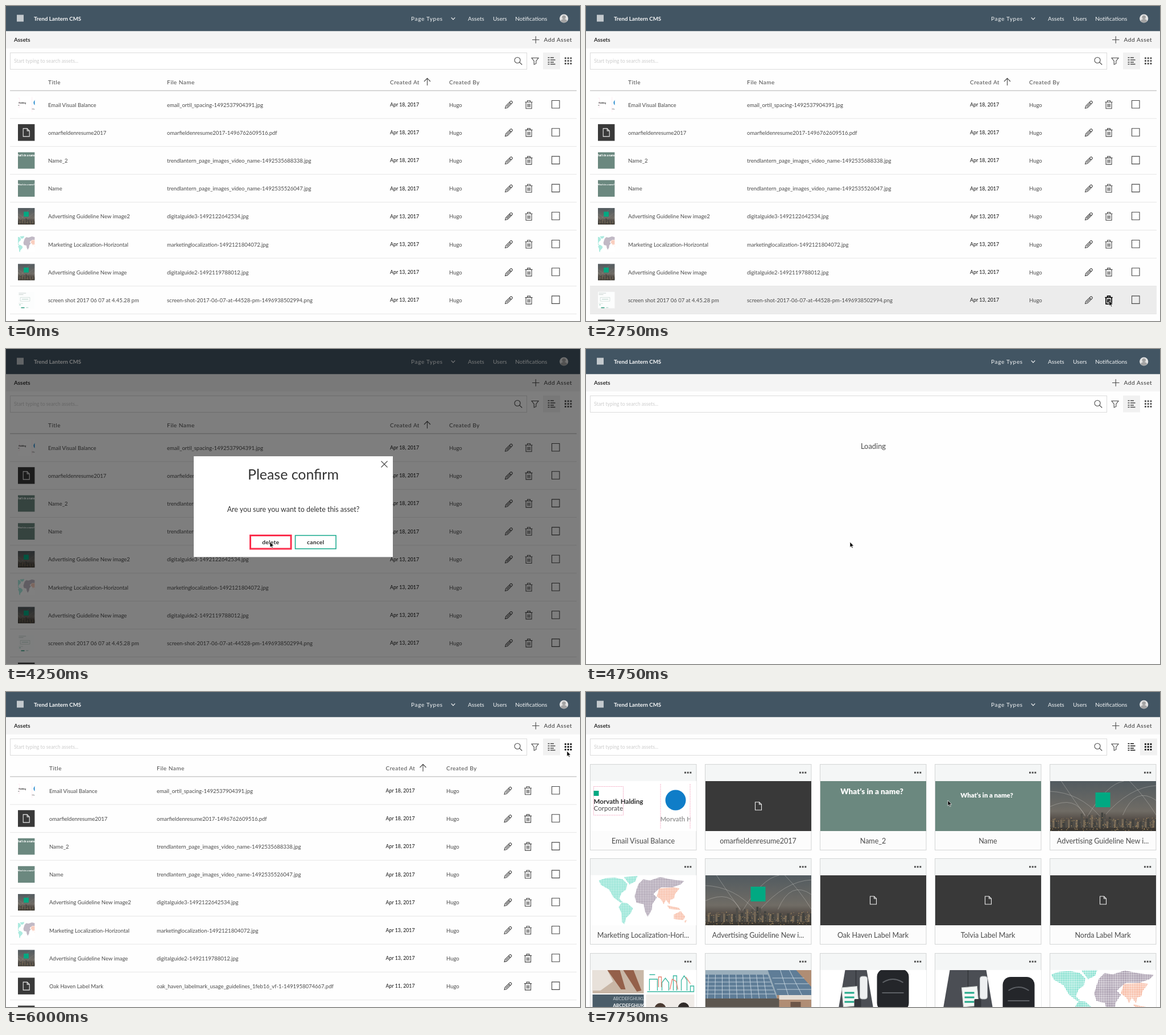
Write an HTML page that moves like this. It is 1009 by 555 pixels and loops after 8 s.

```html
<!DOCTYPE html>
<html lang="en">
<head>
<meta charset="utf-8">
<title>Asset manager</title>
<style>
html, body { margin: 0; width: 100%; height: 100%; overflow: hidden; background: #fefefe; }
svg { display: block; }
text { font-family: Lato, "Open Sans", sans-serif; fill: #4a4a4a; white-space: pre; }
.line { fill: none; stroke: #484848; stroke-width: 1.1; }
.mid { text-anchor: middle; }
.bold { font-weight: 700; fill: #2b2b2b; }
.nav { fill: #f2f4f5; }
.slogan { font-weight: 900; fill: #fff; }
</style>
</head>
<body>
<svg id="stage" width="1009" height="555" viewBox="0 0 1009 555"></svg>
<script>
const LOOP = 8000, ROW = 49.2, TOP = 149;
const stage = document.getElementById('stage');

const text = (x, y, str, size, cls = '', extra = '') =>
  `<text x="${x}" y="${y}" font-size="${size}" class="${cls}" ${extra}>${str}</text>`;
const rect = (x, y, w, h, fill, extra = '') =>
  `<rect x="${x}" y="${y}" width="${w}" height="${h}" fill="${fill}" ${extra}/>`;
const path = (d, extra = 'class="line"') => `<path d="${d}" ${extra}/>`;
const shape = (d, fill) => path(d, `fill="${fill}"`);
const circle = (x, y, r, fill) => `<circle cx="${x}" cy="${y}" r="${r}" fill="${fill}"/>`;
const at = (x, y, body, scale = 1) => `<g transform="translate(${x} ${y}) scale(${scale})">${body}</g>`;
const group = (id, body) => `<g id="${id}">${body}</g>`;
const times = (n, fn) => Array.from({ length: n }, (_, i) => fn(i)).join('');
const spaced = n => `letter-spacing="${n}"`;

let seed = 7;
const rnd = () => (seed = seed * 16807 % 2147483647) / 2147483647;

// Pictures, shared by list thumbnails and grid cards
const dots = (id, color) =>
  `<pattern id="${id}" width="2.6" height="2.6" patternUnits="userSpaceOnUse">${rect(.3, .3, 2, 2, color, 'rx=".7"')}</pattern>`;

const worldMap =
  shape('M2 8L14 4 30 3 44 6 52 14 50 24 42 30 38 40 44 46 40 47 28 38 20 24 6 16Z' +
        'M46 2L70 0 66 10 56 15ZM42 47L52 48 62 57 58 66 50 74 47 85 43 82 42 66 37 55Z', 'url(#teal)') +
  shape('M68 25L72 14 80 6 92 8 110 2 128 6 152 9 146 15 132 20 112 20 104 26 98 32 104 38 96 50 95 60 88 72 83 62 81 50 68 47 65 36Z', 'url(#plum)') +
  shape('M108 22L134 20 144 22 136 32 134 40 128 42 126 50 120 42 116 50 112 42 104 36Z' +
        'M122 52L142 56 146 60 126 58ZM134 68L146 62 154 72 150 78 134 76ZM152 80l5-3-3 6Z', 'url(#coral)');

function city() {
  const blocks = times(42, i => {
    const h = 5 + rnd() * (i > 11 && i < 24 ? 19 : 7);
    return rect(i * 4.5, 78 - h, 3.6, h + 4, ['#514f4a', '#756958', '#41423f'][i % 3]);
  });
  const lights = times(190, () =>
    rect((rnd() * 187).toFixed(1), (64 + rnd() * 23).toFixed(1), 1.3, 1, rnd() > .5 ? '#c9a56b' : '#8d7858'));
  const arcs = path('M0 18Q52 20 88 62M20 0Q50 45 62 60M66 62Q100 5 130 0M95 62Q140 10 187 8M128 60Q150 8 187 34M0 45Q45 24 62 62M140 0Q165 25 187 60',
    'fill="none" stroke="#d8d6cf" stroke-width=".6" opacity=".6"');
  return rect(0, 0, 187, 88, 'url(#dusk)') + arcs + blocks + lights + rect(80, 20, 26, 26, '#01a982');
}

const slogan = (x, y, size) => rect(0, 0, 187, 88, '#6b887f') +
  text(x, y, 'What’s in a name?', size, 'slogan mid');

const spacing = rect(0, 0, 187, 88, '#fff') +
  path('M6 9.5H58V60H6ZM123.5 5V84M175.5 5V84', 'fill="none" stroke="#f19ab8" stroke-width=".8" stroke-dasharray="2 1"') +
  rect(6, 17, 9, 9, '#01a982') +
  text(6, 40, 'Morvath Halding', 11.6, 'bold') + text(6, 51.5, 'Corporate', 11.6) +
  circle(150, 33.5, 18, '#0f7dc8') +
  `<svg width="176" height="88">${text(123, 71, 'Morvath H', 11.4, 'bold', 'style="fill:#999"')}</svg>`;

const screenshot = rect(0, 0, 187, 88, '#fcfdfd') +
  path('M54 8H92M54 15H78', 'stroke="#c9d2cf" stroke-width="3"') +
  path('M62 30H112V50H62ZM54 62H76', 'fill="none" stroke="#c2d4ce" stroke-width="2"') +
  rect(70, 38, 34, 3, '#b7cfc7') + rect(56, 68, 8, 3, '#8cc9b4') +
  rect(66, 82, 18, 5, '#2f9b7e') + rect(92, 82, 12, 4, '#bcd9d0');

const collage = rect(0, 0, 187, 88, '#fff') +
  rect(4, 0, 90, 41, '#c9b7a7') + shape('M30 0H52L62 34H54ZM58 0H76L90 36 82 38Z', '#94604a') +
  shape('M4 0H30L40 20 18 36H4Z', '#e8e1da') +
  path('M100 38H182M104 36V16H118V36M126 36V22l6-8 6 8V36M160 36V18l5-8 5 8V36M176 28h6v10h-6ZM104 8h10M146 36V10h6v26',
    'fill="none" stroke="#38b7a0" stroke-width="1.3"') +
  path('M140 34l4-18 7 4 3 14M120 30v-18h5v18M168 12l8 12', 'fill="none" stroke="#e88372" stroke-width="1.3"') +
  rect(4, 43, 90, 45, '#4b5d69') +
  text(40, 53, 'ABCDEFGHIJKL', 7.5, '', 'style="fill:#c7d0d5"') +
  text(40, 65, 'ABCDEFGHIJKL', 8, 'bold', 'style="fill:#fff"') +
  rect(98, 43, 85, 45, '#f0ece8') + circle(123, 68, 10, '#4a3a31') + circle(164, 67, 10, '#2f2a28');

const solar = rect(0, 0, 187, 88, '#9aaebb') + rect(126, 0, 61, 88, '#b08d74') +
  shape('M0 8H110L126 50H0ZM110 0H160L187 30V44H126Z', '#5f7d97') +
  path('M0 14H112M0 21H115M0 28H118M0 35H120M0 42H123M118 14H174M122 24H182M126 34H187M132 0L146 44M148 0L170 44' +
    Array.from({ length: 9 }, (_, i) => `M${6 + i * 12} 8L${4 + i * 13} 50`).join(''),
    'stroke="#c7d5df" stroke-width=".9" fill="none"') +
  shape('M0 50H130V88H0Z', '#5d5750') + shape('M130 44H187V52H130Z', '#e3ddd5') + rect(150, 56, 18, 32, '#6c5547');

// Jacket at jx (width jw), small items at ix, backpack at px, py
const products = (jx, jw, ix, px, py) => rect(0, 0, 187, 88, '#fff') +
  shape(`M${jx + 12} 0H${jx + jw - 12}L${jx + jw} 70H${jx}Z`, '#4b4e54') +
  path(`M${jx + jw / 2} 0V66`, 'stroke="#33353a" stroke-width="1.5"') +
  at(ix, 31, rect(0, 0, 27, 34, '#f4f6f5', 'stroke="#c9cfcc" transform="rotate(-5)"') +
    path('M5 9h17M5 17h17M5 25h17', 'stroke="#22a98a" stroke-width="3"') +
    rect(32, -20, 13, 40, '#eef0f1', 'rx="4" stroke="#b9bdc0"') +
    rect(22, 20, 12, 22, '#34373c', 'rx="2"')) +
  rect(px, py, 56, 74, '#24262a', 'rx="14"') +
  path(`M${px + 10} ${py + 24}q18-12 36 0M${px + 9} ${py + 42}h38`, 'stroke="#5d6065" stroke-width="2" fill="none"');

const pictures = {
  spacing, screenshot, collage, solar,
  slogan1: slogan(91, 23, 13.6), slogan2: slogan(91, 29, 11.4), city: city(),
  map: rect(0, 0, 187, 88, '#fff') + at(13, 1, worldMap),
  bigMap: rect(0, 0, 187, 88, '#fff') + at(0, -2, worldMap, 1.2),
  kit1: products(32, 62, 38, 100, -2), kit2: products(14, 88, 47, 119, 12)
};

const defs = '<defs>' + dots('teal', '#62d8c2') + dots('plum', '#8b7b92') + dots('coral', '#f5a384') +
  '<linearGradient id="dusk" x2="0" y2="1"><stop stop-color="#525b60"/><stop offset=".6" stop-color="#706c65"/>' +
  '<stop offset=".75" stop-color="#57504a"/><stop offset="1" stop-color="#37342f"/></linearGradient>' +
  Object.entries(pictures).map(([id, body]) =>
    `<symbol id="${id}" viewBox="0 0 187 88" preserveAspectRatio="xMidYMid slice">${body}</symbol>`).join('') + '</defs>';

const docIcon = (x, y) => at(x, y, path('M-5.5-7H1.5L5.5-3V7H-5.5ZM1.5-7V-3H5.5', 'fill="none" stroke="#eee" stroke-width="1.1"'));
const picture = (id, x, y, w, h) => id === 'doc'
  ? rect(x, y, w, h, '#393939') + docIcon(x + w / 2, y + h / 2)
  : `<use href="#${id}" x="${x}" y="${y}" width="${w}" height="${h}"/>`;

// Icons, centred on the origin
const pencil = path('M-6.5 6.5L-5.5 2.5 2.5-5.5Q4-7 5.5-5.5 7-4 5.5-2.5L-2.5 5.5ZM1-4L4-1M-4 4L3-3');
const trash = path('M-6.5-4.5H6.5M-2.5-4.5V-7H2.5V-4.5M-5-4.5V7H5V-4.5M-2-1.5V4.5M0-1.5V4.5M2-1.5V4.5');
const dotGrid = times(9, i => rect(-6 + i % 3 * 4.8, -6 + (i / 3 | 0) * 4.8, 2.8, 2.8, 'currentColor'));
const listIcon = path('M-6.5-5.5h3M-6.5-1.5h3M-6.5 2.5h3M-6.5 6h3M-2-5.5h6M-2-1.5h8.5M-2 2.5h6M-2 6h8.5',
  'stroke="currentColor" stroke-width="1.7"');

const assets = [
  ['spacing', 'Email Visual Balance', 'email_ortil_spacing-1492537904391.jpg', 'Apr 18'],
  ['doc', 'omarfieldenresume2017', 'omarfieldenresume2017-1496762609516.pdf', 'Apr 18'],
  ['slogan1', 'Name_2', 'trendlantern_page_images_video_name-1492535688338.jpg', 'Apr 18'],
  ['slogan2', 'Name', 'trendlantern_page_images_video_name-1492535526047.jpg', 'Apr 18'],
  ['city', 'Advertising Guideline New image2', 'digitalguide3-1492122642534.jpg', 'Apr 13'],
  ['map', 'Marketing Localization-Horizontal', 'marketinglocalization-1492121804072.jpg', 'Apr 13'],
  ['city', 'Advertising Guideline New image', 'digitalguide2-1492119788012.jpg', 'Apr 13']
];
const removed = ['screenshot', 'screen shot 2017 06 07 at 4.45.28 pm', 'screen-shot-2017-06-07-at-44528-pm-1496938502994.png', 'Apr 13'];
const next = ['doc', 'Oak Haven Label Mark', 'oak_haven_labelmark_usage_guidelines_1feb16_vf-1-1491958074667.pdf', 'Apr 11'];

function table(id, [title, file, date, by, edit], rows) {
  const heads = [[title, 'Title'], [file, 'File Name'], [date, 'Created At'], [by, 'Created By']]
    .map(([x, s]) => text(x, 138, s, 10.1, '', spaced(.45))).join('');
  const arrow = at(date + 65.5, 133.5, path('M0 6.5V-6M-5.5-.5L0-6.2 5.5-.5'));
  const body = rows.map(([pic, name, fileName, day], i) => at(0, TOP + ROW * i,
    picture(pic, 21, 10, 29.4, 29.4) +
    text(title, 28.6, name, 9.5) + text(file, 28.6, fileName, 9.5) +
    text(date, 28, day + ', 2017', 8.8, '', 'font-weight="500" style="fill:#222"') + text(by, 28.6, 'Hugo', 9.5) +
    at(edit, 24.7, pencil) + at(edit + 35, 24.7, trash) +
    path('M959.5 17.5h13.5v13.5h-13.5Z') +
    rect(7, ROW - .5, 996, 1, '#e6e6e6'))).join('');
  return group(id, heads + arrow + rect(7, 148.5, 996, 1.3, '#c4c4c4') + body +
    rect(21, TOP + ROW * 8 + 10, 29.4, 20, '#393939'));
}

const cards = [
  ...assets, ['doc', 'Oak Haven Label Mark'], ['doc', 'Tolvia Label Mark'], ['doc', 'Norda Label Mark'],
  ['collage'], ['solar'], ['kit1'], ['kit2'], ['bigMap']
];
const shorten = name => name.length > 27 ? name.slice(0, 27) + '...' : name;
const grid = cards.map(([pic, name = ''], i) => at(7 + Math.floor(i % 5 * 202.2), 127 + Math.floor((i / 5 | 0) * 166.5),
  rect(0, 0, 187, 151, '#fcfcfc') + rect(0, 0, 187, 29.5, '#f4f6f6') +
  rect(.5, .5, 186.5, 151, 'none', 'stroke="#d3d5d5"') +
  picture(pic, 1, 30, 186, 88) +
  times(3, k => rect(166 + k * 4.7, 13.6, 2.9, 2.9, '#4a4a4a')) +
  text(93.5, 139.8, shorten(name), 12.5, 'mid'))).join('');

const header = rect(0, 0, 1009, 44.5, '#425563') + rect(19, 15.5, 12, 12, '#c3c9cd') +
  text(49, 25.5, 'Trend Lantern CMS', 9.7, 'bold', 'style="fill:#f5f6f7"') +
  text(712, 25.5, 'Page Types', 10, 'nav', spaced(.7)) +
  path('M782.7 20.3L786 23.8 789.3 20.3', 'fill="none" stroke="#f2f4f5" stroke-width="1.2"') +
  text(812, 25.5, 'Assets', 10, 'nav') + text(856, 25.5, 'Users', 10, 'nav') + text(895, 25.5, 'Notifications', 10, 'nav') +
  circle(980.7, 22, 7.6, '#e4e4e4') + circle(980.7, 19.8, 3.3, '#a3a3a3') +
  shape('M975 27q.5-4 5.7-4t5.7 4q-5.7 4.5-11.4 0Z', '#a3a3a3');

const toolbar = rect(0, 44.5, 1009, 30, '#f4f4f4') + text(14, 63, 'Assets', 9.8, 'bold') +
  path('M925 59.5H937.5M931.2 53.3V65.7') +
  text(945.5, 63.2, 'Add Asset', 10.1, '', spaced(.55) + ' style="fill:#333"') +
  rect(7.5, 82.5, 908, 29, '#fff', 'stroke="#dcdcdc"') +
  text(14, 100, 'Start typing to search assets...', 8.7, '', 'style="fill:#cdcdcd"') +
  path('M904 95.5a5 5 0 1 1-10 0 5 5 0 1 1 10 0M902.7 99.2L907.2 103.5') +
  path('M924 91.5H936L931.8 97V101.5L928.2 103V97Z') +
  rect(944, 82, 30, 29.5, '#f1f1f1', 'id="toggle"') +
  group('listBtn', at(959, 96.5, listIcon)) + group('gridBtn', at(988, 96.5, dotGrid));

const dialog = rect(330, 189, 350, 177.5, '#fff') +
  path('M659.5 197.5L670.5 208.5M670.5 197.5L659.5 208.5') +
  text(505, 230, 'Please confirm', 24.9, 'mid', 'style="fill:#333"') +
  text(505, 287, 'Are you sure you want to delete this asset?', 12.4, 'mid', 'style="fill:#333"') +
  rect(429.5, 328.5, 71.5, 23.5, '#fff', 'id="deleteBtn"') +
  rect(508.5, 328.5, 71.5, 23.5, '#fff', 'stroke="#13a78a" stroke-width="1.5"') +
  text(465.2, 344, 'delete', 10.3, 'bold mid', spaced(.25)) + text(544.2, 344, 'cancel', 10.3, 'bold mid', spaced(.25));

stage.innerHTML = defs + rect(0, 0, 1009, 555, '#fefefe') + header + toolbar +
  rect(7, 0, 996, ROW, '#ececec', 'id="hover"') +
  table('before', [74, 283, 675, 779, 884], [...assets, removed]) +
  table('after', [76, 265, 667.5, 774, 882.5], [...assets, next]) +
  group('hotTrash', at(919, TOP + ROW * 7 + 24.7, trash.replace('class="line"', 'fill="none" stroke="#000" stroke-width="1.5"'))) +
  group('loading', text(505, 175.5, 'Loading', 12.9, 'mid')) +
  group('cards', grid) +
  group('modal', rect(0, 0, 1009, 555, '#000', 'opacity=".5"') + dialog) +
  group('cursor', path('M0 0V9.5L2.2 7.5 3.7 11 5.2 10.3 3.7 7H6.7Z', 'fill="#000" stroke="#fff" stroke-width=".7"'));

// Pointer stops: start time, x, y
const pointer = [
  [500, 748, 1], [750, 668, 323], [1750, 669, 323], [2000, 913, 462], [2250, 957, 502],
  [2500, 924, 506], [2750, 919.5, 519], [3750, 880, 509], [4000, 470, 335], [4250, 464, 340],
  [5500, 960, 165], [5750, 977, 122], [6000, 986, 104], [7750, 636, 191]
];
// Highlighted row: start, end, index
const hovers = [[2000, 3750, 7], [5250, 5500, 3], [5500, 5750, 0]];

const el = id => document.getElementById(id);
const show = (id, on) => el(id).style.display = on ? '' : 'none';
const set = (id, attrs) => Object.entries(attrs).forEach(([k, v]) => el(id).setAttribute(k, v));

function draw(t) {
  const within = (a, b) => t >= a && t < b;
  const gridView = t >= 7250;
  show('before', t < 4750);
  show('loading', within(4750, 5250));
  show('after', within(5250, 7250));
  show('cards', gridView);
  show('modal', within(3250, 4750));
  show('hotTrash', within(2500, 3750));

  const hover = hovers.find(([a, b]) => within(a, b));
  show('hover', hover);
  if (hover) set('hover', { y: TOP + ROW * hover[2] });

  set('toggle', { x: gridView ? 974 : 944 });
  set('listBtn', { color: gridView ? '#111' : '#4a4a4a' });
  set('gridBtn', { color: t >= 6000 ? '#000' : '#4a4a4a' });
  set('deleteBtn', { 'stroke-width': t < 4000 ? 1.5 : t < 4250 ? 2.2 : 3, stroke: t < 4000 ? '#f04a60' : '#fb2f4d' });

  const stop = pointer.filter(p => p[0] <= t).pop();
  show('cursor', stop);
  if (stop) set('cursor', { transform: `translate(${stop[1]} ${stop[2]})` });
}

const start = performance.now();
function tick() {
  draw((performance.now() - start) % LOOP);
  requestAnimationFrame(tick);
}
tick();
</script>
</body>
</html>
```
